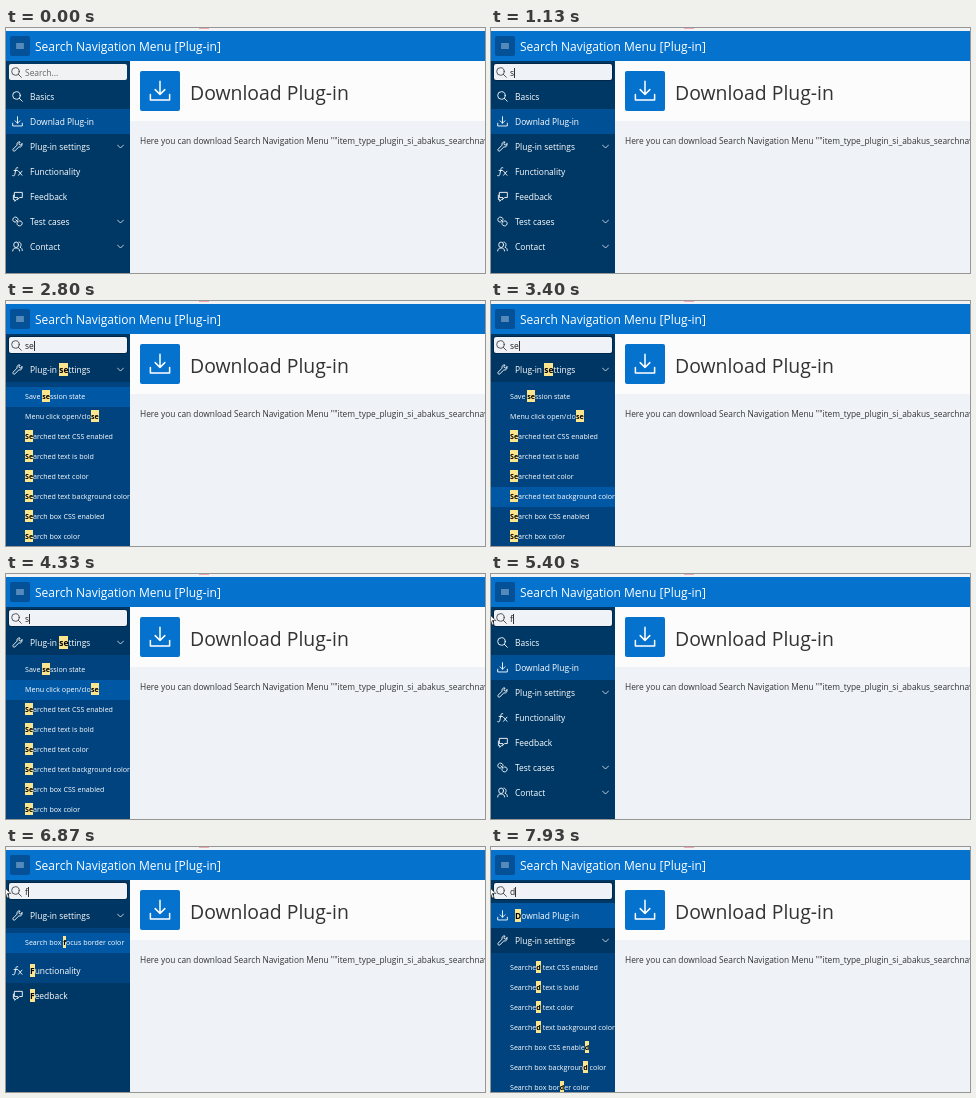
Animation, 479 px wide and 245 px high, one loop 8000 ms. Source, as an HTML page:

```html
<!DOCTYPE html>
<html lang="en">
<head>
<meta charset="utf-8">
<title>Search Navigation Menu</title>
<style>
html, body { margin: 0; width: 100%; height: 100%; overflow: hidden; }
body { position: relative; background: #eff3f8; color: #333; font: 8.45px/25px "Open Sans", "Noto Sans", sans-serif; white-space: nowrap; }
body > * { position: absolute; box-sizing: border-box; }
svg { fill: none; stroke: currentColor; stroke-width: 1.3; stroke-linecap: round; stroke-linejoin: round; }
#strip { left: 0; top: 0; width: 479px; height: 3px; background: #f1f3f5; }
#strip i { position: absolute; left: 193px; width: 10px; height: 1px; background: #efa9b5; }
#bar { left: 0; top: 3px; width: 479px; height: 30px; background: #0572ce; color: #fff; font-size: 12.03px; line-height: 32px; padding-left: 29px; }
#burger { left: 4px; top: 8px; width: 20px; height: 20px; border-radius: 2px; background: #045197; color: #fff; }
#burger svg { position: absolute; left: 6px; top: 6px; width: 8px; height: 8px; }
#head { left: 124px; top: 33px; width: 355px; height: 60px; background: #fcfcfd; }
#tile { left: 134px; top: 43px; width: 40px; height: 40px; border-radius: 2px; background: #0572ce; color: #fff; }
#tile svg { position: absolute; left: 9px; top: 9px; width: 22px; height: 22px; stroke-width: 1.1; }
h1 { left: 184px; top: 49.5px; margin: 0; font-size: 19.4px; line-height: 30px; font-weight: 400; }
#note { left: 134px; top: 100px; font-size: 8.35px; }
#nav { left: 0; top: 33px; width: 124px; height: 212px; overflow: hidden; background: #003865; color: #fff; }
#list { position: absolute; top: 23px; width: 124px; }
.row { position: relative; height: 25px; padding-left: 24px; }
.row svg { position: absolute; left: 6px; top: 7px; width: 11px; height: 11px; }
.row .chev { left: 110.5px; top: 9px; width: 7px; height: 7px; stroke-width: 1.7; }
.row.open { background: #003663; }
.row.now { background: #005095; }
.row.lit { background: #00437e; }
.subs { overflow: hidden; background: #00437e; }
.sub { height: 20px; padding-left: 19px; font-size: 7.1px; line-height: 19px; overflow: hidden; text-overflow: ellipsis; }
.sub:first-child { margin-top: 5px; }
.row.sel, .sub.sel { background: #0057a4; }
mark { background: #fde58d; color: #000; font-weight: 700; padding: 1px 0; }
#box { left: 3px; top: 36px; width: 118px; height: 16px; border-radius: 2px; background: #f1f2f3; color: #666; line-height: 17px; padding-left: 16px; }
#box.focus { background: #eff2f6; color: #222; box-shadow: 0 0 0 1px #00264a; }
#box svg { position: absolute; left: 2px; top: 3px; width: 11px; height: 11px; color: #444; }
#caret { display: inline-block; width: 1px; height: 10px; background: #333; vertical-align: -2px; }
#mouse { left: 0; top: 0; width: 9px; height: 13px; }
</style>
</head>
<body>
<div id="strip"><i></i></div>
<div id="bar">Search Navigation Menu [Plug-in]</div>
<div id="burger"></div>
<div id="head"></div>
<div id="tile"></div>
<h1>Download Plug-in</h1>
<div id="note">Here you can download Search Navigation Menu ""item_type_plugin_si_abakus_searchnav</div>
<div id="nav"><div id="list"></div></div>
<div id="box"></div>
<svg id="mouse" viewBox="0 0 9 13"><path d="M.5 .5V10L2.8 8 4.4 12 6 11.3 4.4 7.5H7.5Z" fill="#fff" stroke="#222" stroke-width=".6"/></svg>
<script>
const LOOP = 8000, SLIDE = 260;
const $ = id => document.getElementById(id);

const paths = {
  search: 'M10.5 10.5L15 15M12 6.5A5.5 5.5 0 1 1 1 6.5A5.5 5.5 0 0 1 12 6.5Z',
  download: 'M8 1V10.5M4.5 7L8 10.5L11.5 7M1 10.5V14.5H15V10.5',
  wrench: 'M14.5 4.2L11.8 6.2L9.8 4.2L11.8 1.5C9 .5 6.5 3 7.4 6L1.5 12C.5 13.5 2.5 15.5 4 14.5L10 8.6C13 9.5 15.5 7 14.5 4.2Z',
  fx: 'M8.5 2.5C6.5 1.5 6 3 5.6 5L4 12.5C3.6 14.5 2.5 14.5 1 14M3 6.5H8M9.5 7.5L14.5 13.5M14.5 7.5L9.5 13.5',
  chat: 'M4 2H15V9.5H11L8.5 12V9.5H4ZM2 6V12.5H4V15L6.5 12.5H8',
  link: 'M8.7 8.7L5.5 5.5M6 8.5C4 10 1 8 1.2 5C1.5 2 5 .5 7.5 2.5C9 4 9 5.5 8.5 6.5M10 7.5C12 6 15 8 14.8 11C14.5 14 11 15.5 8.5 13.5C7 12 7 10.5 7.5 9.5',
  people: 'M9.5 5.5A3.5 4 0 1 1 2.5 5.5A3.5 4 0 0 1 9.5 5.5ZM1 14.5C1 11.5 3 10.2 6 10.2S11 11.5 11 14.5M10 1.6C14 1.6 14 8 11.5 9C14 10 15 11.5 15 14',
  chev: 'M1 4.5L8 11.5L15 4.5',
  menu: 'M1 4H15M1 8H15M1 12H15'
};
const icon = (name, cls = '') => `<svg class="${cls}" viewBox="0 0 16 16"><path d="${paths[name]}"/></svg>`;

const settings = [
  'Save session state', 'Menu click open/close',
  ...['CSS enabled', 'is bold', 'color', 'background color'].map(s => 'Searched text ' + s),
  ...['CSS enabled', 'color', 'background color', 'border color', 'focus border color'].map(s => 'Search box ' + s)
];
const menu = [
  ['Basics', 'search'], ['Downlad Plug-in', 'download'], ['Plug-in settings', 'wrench', settings],
  ['Functionality', 'fx'], ['Feedback', 'chat'], ['Test cases', 'link', []], ['Contact', 'people', []]
];

// [start time, value]
const typed = [[0, ''], [1070, 's'], [1270, 'se'], [4330, 's'], [4530, ''], [5270, 'f'], [6930, ''], [7470, 'd']];
const filters = [[-SLIDE, ''], [1470, 'se'], [4530, ''], [5470, 'f'], [6930, ''], [7670, 'd']];
const caretOff = [[0, 800], [1800, 2000], [2270, 2530], [2930, 3330], [3800, 4200], [4730, 5000], [6130, 6670], [7130, 7470]];
const entry = [[70, 284, 184], [270, 226, 104], [470, 150, 34], [600, 104, 17], [800, 62, 40], [1000, 62, 40]];
const exit = [[5000, 44, 42], [5330, -3, 39], [LOOP, -3, 39]];

const last = (list, t) => list.filter(e => e[0] <= t).pop();
const ease = p => p * p * (3 - 2 * p);
const has = (text, q) => text.toLowerCase().includes(q);

function mark(text, q) {
  const i = text.toLowerCase().indexOf(q), end = i + q.length;
  return q && i >= 0 ? `${text.slice(0, i)}<mark>${text.slice(i, end)}</mark>${text.slice(end)}` : text;
}

function along(path, t) {
  const i = path.findIndex(p => p[0] > t);
  if (i < 1) return null;
  const [a, b] = [path[i - 1], path[i]], p = (t - a[0]) / (b[0] - a[0]);
  return [a[1] + (b[1] - a[1]) * p, a[2] + (b[2] - a[2]) * p];
}

// Arrow keys move the selection, counted from the first visible line.
function selected(q, t) {
  if (q === 'f') return t < 6070 ? 0 : 1;
  if (q !== 'se' || t < 2530) return 0;
  return t < 3500 ? Math.min(6, Math.floor((t - 2530) / 140)) : Math.max(2, 5 - Math.floor((t - 3500) / 190));
}

function listHtml(q, sel, open) {
  let line = 0;
  const pick = () => line++ === sel && q ? 'sel' : '';
  return menu.map(([name, ico, kids]) => {
    const subs = (kids || []).filter(k => has(k, q));
    if (!has(name, q) && !subs.length) return '';
    const cls = ico === 'download' ? 'now' : subs.length && q ? 'open' : q && ico === 'fx' ? 'lit' : '';
    const row = `<div class="row ${cls} ${pick()}">${icon(ico)}${mark(name, q)}${kids ? icon('chev', 'chev') : ''}</div>`;
    const height = (subs.length * 20 + 10) * open;
    const items = subs.map(k => `<div class="sub ${pick()}">${mark(k, q)}</div>`).join('');
    return row + (subs.length && open ? `<div class="subs" style="height:${height}px">${items}</div>` : '');
  }).join('');
}

const shown = {};
function put(id, html) {
  if (shown[id] !== html) $(id).innerHTML = shown[id] = html;
}

function draw(t) {
  const text = last(typed, t)[1], [start, q] = last(filters, t);
  const p = ease(Math.min(1, (t - start) / SLIDE));
  put('list', listHtml(q, selected(q, t), q ? p : 1 - p));

  const focus = t >= 800;
  const caret = focus && !caretOff.some(([a, b]) => t >= a && t < b);
  $('box').className = focus ? 'focus' : '';
  put('box', icon('search') + (text || (focus ? '' : 'Search...')) + (caret ? '<i id="caret"></i>' : ''));

  const at = along(entry, t) || along(exit, t);
  $('mouse').style.display = at ? '' : 'none';
  if (at) $('mouse').style.transform = `translate(${at[0]}px,${at[1]}px)`;
}

put('burger', icon('menu'));
put('tile', icon('download'));

const begin = performance.now();
function tick() {
  draw((performance.now() - begin) % LOOP);
  requestAnimationFrame(tick);
}
tick();
</script>
</body>
</html>
```
